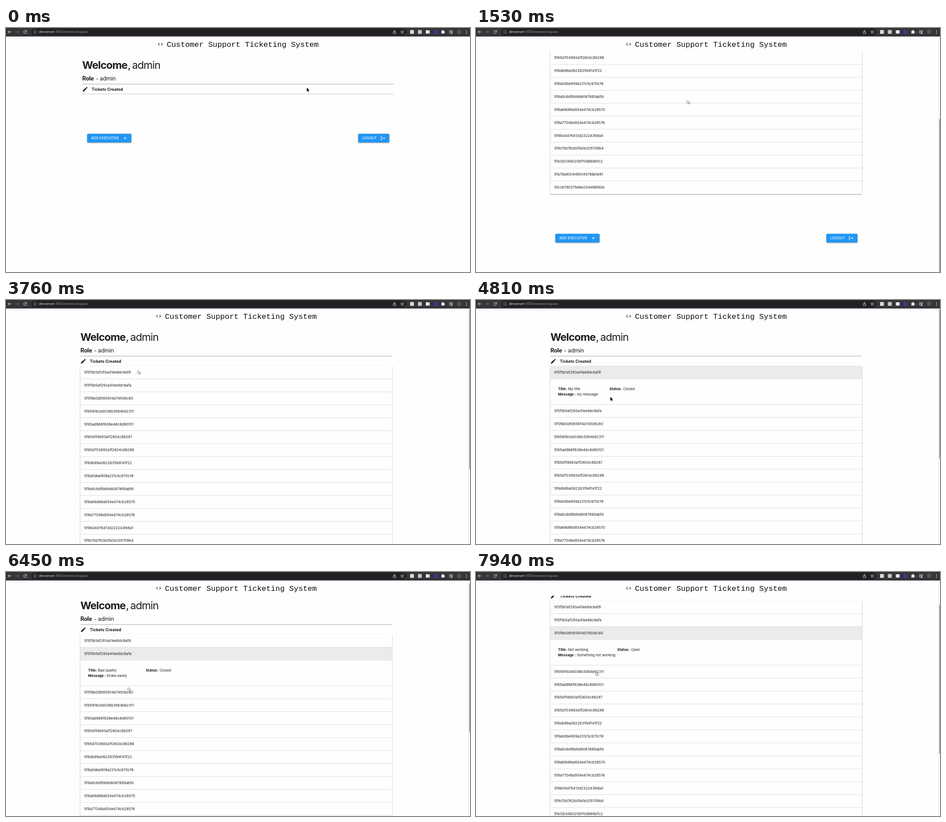
Write an HTML page with a canvas that moves like this. It is 1029x544 px and loops after 8000 ms.

```html
<!DOCTYPE html>
<html lang="en">
<head>
<meta charset="utf-8">
<title>Ticketing dashboard</title>
<style>
html, body { margin: 0; width: 100%; height: 100%; overflow: hidden; background: #fefefe; }
canvas { display: block; }
</style>
</head>
<body>
<canvas id="stage" width="1029" height="544"></canvas>
<script>
const ctx = document.getElementById('stage').getContext('2d');
const W = 1029, H = 544, LOOP = 8000;
const PAGE = '#fefefe', INK = '#1d1d1d', BLUE = '#2196f3';
const BAR_H = 19, HEADER_BOTTOM = 53, LIST_TOP = 147, ROW_H = 28.88, PANEL_H = 57;
const LEFT = 169, WIDTH = 691;

const ids = `5f5f5b1af293a41ee8dc6af8 5f5f5b5af293a41ee8dc6afa 5f5f6b0dfd55914d74506c80
5f65916cbd036b3564b62311 5f65ad988f638e46c8d90101 5f65d1f4693a1f2604c86287
5f65d703693a1f2604c86289 5f6db89a0622831fe8141f22 5f8a0dbe909a231c5c670c19
5f8a5c6df6b9d6087895abfd 5f8a69d96a554e474cb28570 5f8a77046a554e474cb28576
5f9b04d76413d232243fe6a1 5f9c15d762b0fa0e205709b4 5fa12b34b020bf10d868d1c2
5fa78a90c9490145786b1e91 5fcc6790375e9e204498f60e`.split(/\s+/);

const details = [
  { title: 'My title', message: 'my message', status: 'Closed', statusX: 131 },
  { title: 'Bad quality', message: 'broke easily', status: 'Closed', statusX: 145 },
  { title: 'Not working', message: 'Something not working', status: 'Open', statusX: 148.3 }
];

// Timeline: the picture only advances at these ticks [first, last, count].
const ticks = [[0, 0, 1], [480, 480, 1], [930, 1970, 8], [2120, 2570, 4], [3020, 4060, 8],
  [4210, 4210, 1], [4510, 5550, 8], [5700, 5700, 1], [6000, 6900, 7], [7050, 7940, 7]]
  .flatMap(([a, b, n]) => Array.from({ length: n }, (_, i) => Math.min(a + 150 * i, b)));
const EXPAND = 480;
const clicks = [3830, 5330, 6620];
const scrollKeys = [[880, 0], [1530, 268], [1830, 247], [1970, 247], [2570, 0],
  [5950, 0], [6300, 8], [6950, 8], [7940, 83]];
const pointerKeys = [[850, 667, 133], [1530, 468, 161], [1970, 440, 205], [2420, 403, 257],
  [2900, 403, 257], [3320, 335, 114], [3620, 292, 157], [3830, 292, 160], [4060, 295, 198],
  [4400, 296, 204], [4810, 298, 216], [5200, 276, 240], [5700, 269, 240],
  [5900, 269, 240], [6300, 270, 257], [6900, 270, 257], [7700, 265, 223]];

const ease = p => p * p * (3 - 2 * p);
const ramp = (t, start, length) => ease(Math.min(1, Math.max(0, (t - start) / length)));

function sample(keys, t) {
  const next = keys.findIndex(k => k[0] > t);
  if (next === 0) return keys[0].slice(1);
  if (next < 0) return keys[keys.length - 1].slice(1);
  const a = keys[next - 1], b = keys[next];
  const p = ramp(t, a[0], b[0] - a[0]);
  return a.slice(1).map((v, i) => v + (b[i + 1] - v) * p);
}

function text(str, x, y, size, { weight = 400, color = INK, spacing = 0, family = 'Inter, sans-serif' } = {}) {
  ctx.font = `${weight} ${size}px ${family}`;
  ctx.letterSpacing = spacing + 'px';
  ctx.fillStyle = color;
  ctx.fillText(str, x, y);
}

function rect(x, y, w, h, color, radius = 0) {
  ctx.fillStyle = color;
  ctx.beginPath();
  ctx.roundRect(x, y, w, h, radius);
  ctx.fill();
}

function disc(x, y, r, color) {
  ctx.fillStyle = color;
  ctx.beginPath();
  ctx.arc(x, y, r, 0, Math.PI * 2);
  ctx.fill();
}

function stroke(d, x, y, color, width = 1) {
  ctx.save();
  ctx.translate(x, y);
  ctx.strokeStyle = color;
  ctx.lineWidth = width;
  ctx.stroke(new Path2D(d));
  ctx.restore();
}

function icon(d, x, y, scale, color) {
  ctx.save();
  ctx.translate(x, y);
  ctx.scale(scale, scale);
  ctx.translate(-12, -12);
  ctx.fillStyle = color;
  ctx.fill(new Path2D(d));
  ctx.restore();
}

function raised(x, y, w, h, color, radius) {
  ctx.save();
  ctx.shadowColor = 'rgba(0,0,0,.42)';
  ctx.shadowBlur = 2.5;
  ctx.shadowOffsetY = 1;
  rect(x, y, w, h, color, radius);
  ctx.restore();
}

const PENCIL = 'M3 17.25V21h3.75L17.8 9.95l-3.75-3.75zM20.7 7.05q.7-.7 0-1.4l-2.35-2.35q-.7-.7-1.4 0L15.1 5.1l3.75 3.75z';
const CODE = 'M9.4 16.6L4.8 12l4.6-4.6L8 6l-6 6 6 6zM14.6 16.6l4.6-4.6-4.6-4.6L16 6l6 6-6 6z';
const ARROW = 'M0 0V8.4L1.9 6.7L3.2 9.6L4.7 8.9L3.4 6.1H6Z';
const HAND = 'M.2 .9Q1-.2 1.7 .9L2.3 3.3Q3.2 2.7 3.8 3.4Q4.7 2.9 5.2 3.7Q6.4 3.4 6.5 4.7Q6.6 6.7 5.6 8.4H1.9L-.9 5.5Q-1.3 4.3 .1 4.6L1 5.2Z';

function drawBrowserBar() {
  const light = '#e4e6e9', dim = '#96999e';
  rect(0, 0, W, BAR_H, '#35363a');
  rect(56, 1, 832, 15.5, '#202124', 8);
  stroke('M4 0H-3M0-3.3L-3.3 0L0 3.3', 8, 8.7, light);
  stroke('M-4 0H3M0-3.3L3.3 0L0 3.3', 25, 8.7, '#77797d');
  stroke('M2.5-2A3.2 3.2 0 1 0 3.1 1M3.2-3.6V-1H.6', 42.5, 8.8, light);
  stroke('M3.5 0A3.5 3.5 0 1 1-3.5 0A3.5 3.5 0 1 1 3.5 0M0-.4V2M0-2V-1.1', 64.3, 8.8, dim, .8);
  text('devserver', 73, 11.3, 7.2, { color: light });
  ctx.textAlign = 'left';
  const hostWidth = ctx.measureText('devserver').width;
  text(':4100/teamworkspace', 73 + hostWidth, 11.3, 7.2, { color: dim });

  stroke('M-1.2-1H-2.7V3.6H2.7V-1H1.2M0 1.4V-4M-1.7-2.4L0-4L1.7-2.4', 861.5, 9, light, .8);
  stroke('M0-3.7L1.1-1.2L3.7-.9L1.7.8L2.3 3.4L0 2L-2.3 3.4L-1.7.8L-3.7-.9L-1.1-1.2Z', 879, 8.8, light, .8);
  rect(896, 4.5, 8.5, 8.5, '#dadbd9', 1);
  rect(913.5, 4.5, 8.5, 8.5, '#c5c7c9', 1);
  rect(931, 5, 8.5, 7.5, '#e4e5e7', 1);
  rect(949.3, 5, 5.8, 8, '#6424b0');
  rect(965.5, 6, 6.5, 6.5, light, 1);
  disc(968.7, 6, 1.4, light);
  disc(972, 9.2, 1.4, light);
  stroke('M-4-3H2M-4-.6H2M-4 1.8H-1M3 2.5V-3H5', 986.5, 9, light);
  disc(987.8, 11.7, 1.5, light);
  disc(1005, 8.2, 5, '#5b5048');
  for (const dy of [-3, 0, 3]) disc(1021.3, 8.8 + dy, .9, light);
}

function drawButton(x, y, w, label) {
  raised(x, y - 9.7, w, 19.4, BLUE, 2);
  text(label, x + 8.7, y + 2.7, 7.4, { weight: 500, color: '#fff', spacing: .2 });
}

function drawPanel(detail, y, open) {
  ctx.save();
  ctx.beginPath();
  ctx.rect(LEFT - 4, y, WIDTH + 8, PANEL_H * open);
  ctx.clip();
  const bold = { weight: 700 }, size = 7.8, x = LEFT + 17;
  text('Title:', x, y + 25, size, bold);
  text(detail.title, x + 22, y + 25, size);
  text('Message :', x, y + 37.4, size, bold);
  text(detail.message, x + 41.8, y + 37.4, size);
  text('Status:', LEFT + detail.statusX, y + 25, size, bold);
  text(detail.status, LEFT + detail.statusX + 30.4, y + 25, size);
  ctx.restore();
}

function drawList(rows, bottom, active) {
  raised(LEFT, LIST_TOP, WIDTH, bottom - LIST_TOP, PAGE, 1);
  rows.forEach(({ y, open }, i) => {
    if (i === active) rect(LEFT, y, WIDTH, ROW_H, '#ebebeb');
    if (i) rect(LEFT, y - .5, WIDTH, 1, '#dcdcdc');
    text(ids[i], LEFT + 8.6, y + 17, 7.95);
    if (open > 0) {
      rect(LEFT, y + ROW_H - .5, WIDTH, 1, '#e2e2e2');
      drawPanel(details[i], y + ROW_H, open);
    }
  });
}

function drawContent(rows, bottom, active, expanded) {
  text('Welcome', LEFT, 91.3, 23.3, { weight: 700, spacing: -.9 });
  text(',', LEFT + 101, 91.3, 23.3);
  text('admin', LEFT + 110.5, 91.3, 23.3, { spacing: -.9 });
  text('Role', LEFT, 117.2, 12.7, { weight: 700, spacing: -.3 });
  text('- admin', LEFT + 30.3, 117.2, 12.7, { spacing: -.3 });
  rect(LEFT, 124.4, WIDTH, 1.3, '#b4b4b4');
  icon(PENCIL, LEFT + 6.5, 136.5, .58, INK);
  text('Tickets Created', LEFT + 21, 140.3, 9, { weight: 700 });
  if (expanded) drawList(rows, bottom, active);
  else rect(LEFT, LIST_TOP - .6, WIDTH, 1.1, '#c6c6c6');

  const y = bottom + 98.5;
  drawButton(180, y, 98, 'ADD EXECUTIVE');
  stroke('M-3.3 0H3.3M0-3.3V3.3', 264, y, '#fff');
  drawButton(781, y, 69, 'LOGOUT');
  stroke('M-1-4H-4V4H-1M-2 0H4.3M2.2-2.2L4.4 0L2.2 2.2', 835.8, y, '#fff');
}

function drawPointer(x, y, hand) {
  ctx.save();
  ctx.translate(x, y);
  ctx.lineJoin = 'round';
  const shape = new Path2D(hand ? HAND : ARROW);
  ctx.strokeStyle = hand ? '#111' : '#fff';
  ctx.fillStyle = hand ? '#fff' : '#000';
  ctx.lineWidth = hand ? .9 : 1.4;
  ctx.stroke(shape);
  ctx.fill(shape);
  if (hand) {
    ctx.lineWidth = .6;
    ctx.stroke(new Path2D('M2.6 5.4V7M3.7 5.4V7M4.8 5.4V7'));
  }
  ctx.restore();
}

function draw(time) {
  const t = ticks.filter(tick => tick <= time).pop();
  const expanded = t >= EXPAND;
  const active = clicks.filter(c => c <= t).length - 1;
  const [scroll] = sample(scrollKeys, t);
  const shift = expanded ? -4 : 0;

  let bottom = LIST_TOP, opened = 0;
  const rows = ids.map((_, i) => {
    const open = i < clicks.length
      ? ramp(t, clicks[i], 300) - (i + 1 < clicks.length ? ramp(t, clicks[i + 1], 300) : 0)
      : 0;
    const y = bottom;
    if (expanded) bottom += ROW_H + PANEL_H * open;
    opened += open;
    return { y, open };
  });

  rect(0, 0, W, H, PAGE);
  ctx.save();
  ctx.beginPath();
  ctx.rect(0, HEADER_BOTTOM, W, H - HEADER_BOTTOM);
  ctx.clip();
  ctx.translate(shift, -scroll);
  drawContent(rows, bottom, active, expanded);
  ctx.restore();

  icon(CODE, 342.3 + shift, 36.3, .55, INK);
  text('Customer Support Ticketing System', 356.6 + shift, 42, 17,
    { color: '#0c0c0c', family: '"Liberation Mono", monospace' });

  if (expanded) {
    const height = 772 + PANEL_H * opened, view = H - BAR_H;
    rect(1025, BAR_H, 4, view, '#fafafa');
    rect(1025, BAR_H, .8, view, '#e6e6e6');
    rect(1027, 20.5 + scroll * view / height, 2, view * view / height, '#a3a3a3', 1);
  }
  drawBrowserBar();

  const [x, y] = sample(pointerKeys, t);
  const pageY = y + scroll;
  const hand = expanded && rows.some(r => pageY >= r.y && pageY < r.y + ROW_H);
  drawPointer(x, y, hand);
}

function frame(now) {
  draw(now % LOOP);
  requestAnimationFrame(frame);
}
draw(0);
requestAnimationFrame(frame);
</script>
</body>
</html>
```
